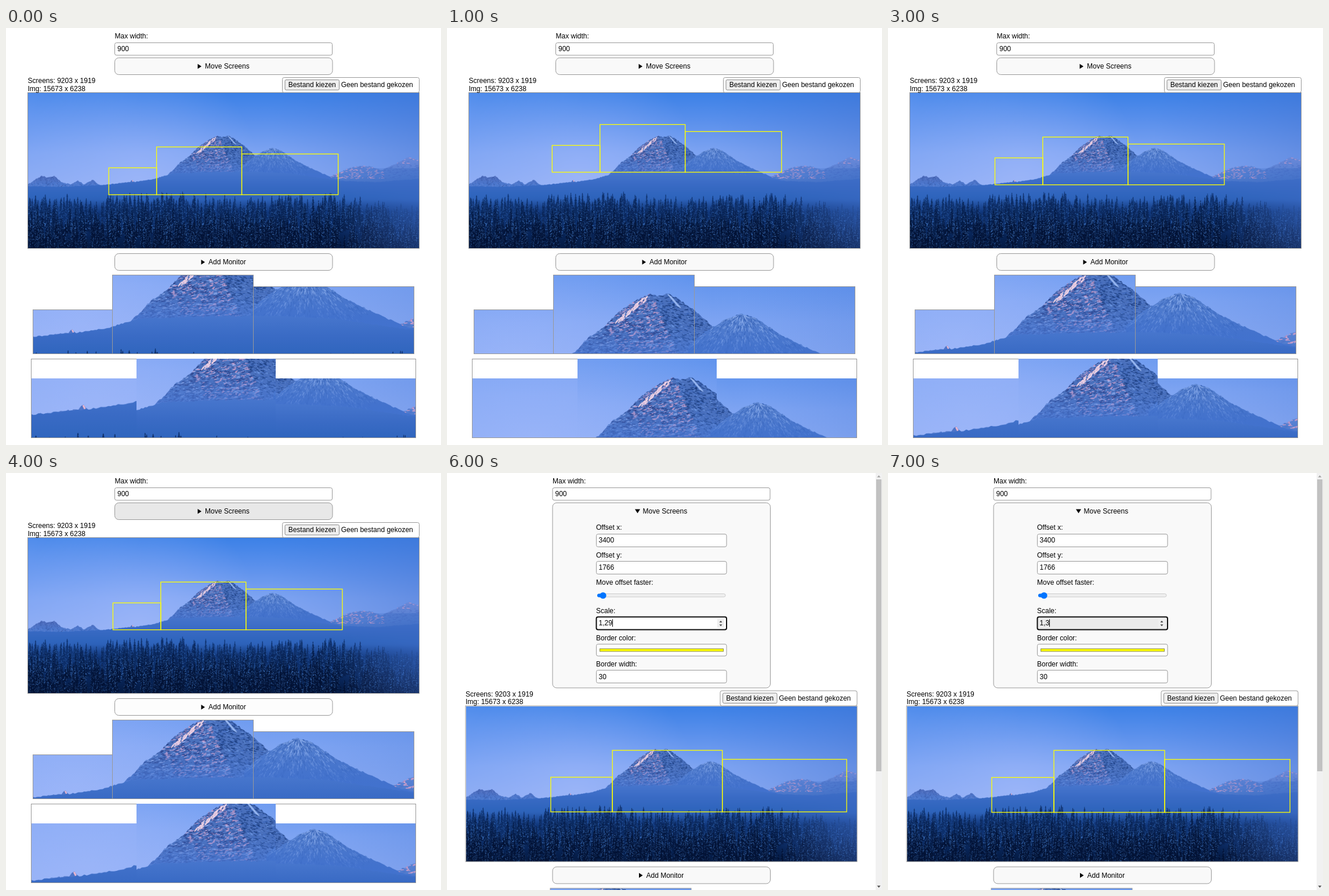
These frames come from a looping animation (750x720 px, 8 s). An HTML page with a canvas:

```html
<!DOCTYPE html>
<html lang="en">
<head>
<meta charset="utf-8">
<title>Screens over a wallpaper</title>
<style>
  html, body { margin: 0; width: 100%; height: 100%; overflow: hidden; background: #fff; }
  canvas, svg { position: absolute; left: 0; top: 0; width: 750px; height: 720px; }
  svg { font: 12px "Liberation Sans", Arial, sans-serif; }
  rect { stroke: #999; fill: #fff; }
  .card { fill: #f9f9f9; }
  .button { fill: #efefef; stroke: #8a8a8a; }
  .focus { stroke: #101010; stroke-width: 2; }
  .plain { stroke: none; }
</style>
</head>
<body>
<canvas id="view" width="750" height="720"></canvas>
<svg viewBox="0 0 750 720">
  <g id="top">
    <text x="187.5" y="18">Max width:</text>
    <rect x="187.5" y="25.5" width="375" height="21.5" rx="3"/>
    <text x="192" y="40">900</text>
    <rect id="move" class="card" x="187.5" y="51.5" width="375.5" height="29" rx="7"/>
    <path id="arrow"/>
    <text x="343" y="70">Move Screens</text>
  </g>
  <g id="panel">
    <text x="257" y="98">Offset x:</text>
    <rect x="257.5" y="105.5" width="224.5" height="22" rx="3"/>
    <text x="261.5" y="120">3400</text>
    <text x="257" y="146">Offset y:</text>
    <rect id="offsetY" x="257.5" y="152.5" width="224.5" height="22" rx="3"/>
    <text x="261.5" y="167">1766</text>
    <text x="257" y="193">Move offset faster:</text>
    <rect x="259.5" y="208.5" width="220.5" height="5.5" rx="2.7" style="fill:#efefef;stroke:#ccc"/>
    <rect class="plain" x="259" y="208.5" width="10" height="6" rx="3" style="fill:#0075ff"/>
    <circle cx="269" cy="211.5" r="5.6" fill="#0075ff"/>
    <text x="257" y="242">Scale:</text>
    <rect id="scale" x="257.5" y="248.5" width="224.5" height="22" rx="3"/>
    <text id="scaleText" x="261.5" y="263">1</text>
    <text x="257" y="289">Border color:</text>
    <rect x="257.5" y="295.5" width="224.5" height="20.5" rx="3"/>
    <rect x="263.5" y="303.5" width="213" height="4.5" style="fill:#ff0;stroke:#8a8a50"/>
    <text x="257" y="334">Border width:</text>
    <rect x="257.5" y="340.5" width="224.5" height="22" rx="3"/>
    <text x="261.5" y="356">30</text>
    <g id="spin">
      <rect class="plain" x="466" y="156" width="12" height="15" style="fill:#efefef"/>
      <path d="M469.500 162l2.500-3 2.500 3zM469.500 165.500l2.500 3 2.500-3z" fill="#444"/>
    </g>
    <path id="caret" stroke="#000"/>
    <rect class="plain" x="739" y="0" width="11" height="720" style="fill:#f1f1f1"/>
    <rect class="plain" x="740" y="11" width="9" height="504" style="fill:#c1c1c1"/>
    <path d="M741.500 7.500l3-3.500 3 3.500z" fill="#a3a3a3"/>
    <path d="M741.500 712.500l3 3.500 3-3.500z" fill="#505050"/>
  </g>
  <g id="low">
    <text x="37.5" y="95">Screens: 9203 x 1919</text>
    <text x="37.5" y="108.500">Img: 15673 x 6238</text>
    <rect x="476.5" y="85.5" width="236" height="26" rx="3"/>
    <rect class="button" x="481" y="89.5" width="93.5" height="17.500" rx="2"/>
    <text x="486.700" y="102">Bestand kiezen</text>
    <text x="577.700" y="102">Geen bestand gekozen</text>
    <rect id="add" class="card" x="187.5" y="389.5" width="375.5" height="29" rx="7"/>
    <path d="M336.500 400v8.500l6.500-4.200z"/>
    <text x="349" y="408">Add Monitor</text>
  </g>
</svg>
<script>
const $ = id => document.getElementById(id);
const W = 674.5, H = 268.5, RES = 2.5;

let seed = 11;
const rnd = () => (seed = (seed * 48271) % 2147483647) / 2147483647;
const span = (a, b) => a + (b - a) * rnd();

function paintScene() {
  const pic = document.createElement('canvas');
  pic.width = W * RES;
  pic.height = H * RES;
  const c = pic.getContext('2d');
  c.scale(RES, RES);
  c.lineCap = 'round';

  const stops = (g, list) => {
    list.forEach(([at, color]) => g.addColorStop(at, color));
    return g;
  };
  const vert = (y0, y1, ...list) => stops(c.createLinearGradient(0, y0, 0, y1), list);
  const horiz = (x0, x1, ...list) => stops(c.createLinearGradient(x0, 0, x1, 0), list);
  const glow = (x, y, r, rgb, alpha) => stops(c.createRadialGradient(x, y, 0, x, y, r),
    [[0, `rgba(${rgb},${alpha})`], [1, `rgba(${rgb},0)`]]);
  const wash = (fill, y = 0, h = H) => {
    c.fillStyle = fill;
    c.fillRect(0, y, W, h);
  };
  const line = (x, y, dx, dy, color, width) => {
    c.strokeStyle = color;
    c.lineWidth = width;
    c.beginPath();
    c.moveTo(x, y);
    c.lineTo(x + dx, y + dy);
    c.stroke();
  };

  // Fills a jagged skyline given as x, y, x, y, ...
  function ridge(pts, rough, fill, floor = 185) {
    c.beginPath();
    c.moveTo(pts[0], floor);
    for (let i = 0; i < pts.length - 2; i += 2) {
      const [x, y, u, v] = pts.slice(i, i + 4);
      const n = Math.ceil((u - x) / 2);
      for (let k = 0; k < n; k++) {
        c.lineTo(x + (u - x) * k / n, y + (v - y) * k / n + (k ? span(-rough, rough) : 0));
      }
    }
    c.lineTo(pts[pts.length - 2], pts[pts.length - 1]);
    c.lineTo(pts[pts.length - 2], floor);
    c.fillStyle = fill;
    c.fill();
  }
  function textured(draw, paint) {
    c.save();
    draw();
    c.clip();
    paint();
    c.restore();
  }

  // Sky
  wash(vert(0, 160, [0, '#3c81e7'], [.3, '#5a90ec'], [.65, '#7ea4f2'], [1, '#8fadf3']));
  wash(glow(190, 145, 210, '172,192,255', .45));
  wash(glow(0, 40, 200, '140,175,250', .3));
  wash(horiz(420, 675, [0, 'rgba(64,116,216,0)'], [1, 'rgba(64,112,206,.42)']));

  // Far ranges
  textured(() => ridge([0, 158, 10, 151, 24, 143, 33, 146, 45, 143, 58, 154, 74, 158, 86, 151, 96, 158,
    112, 150, 125, 160, 150, 157, 176, 154, 180, 150, 184, 154], 1,
    vert(140, 175, [0, '#4c66b4'], [.5, '#4c78ce'], [1, '#4a78cc'])),
  () => {
    for (let i = 0; i < 220; i++) {
      line(span(0, 130), span(143, 162), span(-3, 3), 2, rnd() < .5 ? 'rgba(45,75,150,.5)' : 'rgba(130,150,220,.4)', .7);
    }
    line(180, 151, 1, 2, '#e8b6cf', 1.5);
  });
  textured(() => ridge([505, 154, 522, 144, 538, 137, 556, 129, 572, 126, 590, 127, 602, 131, 612, 133, 628, 125,
    642, 118, 656, 111, 666, 113, 675, 117], 1, vert(110, 165, [0, '#6a88d8'], [.6, '#5580d2'], [1, '#3f6cc0'])),
  () => {
    for (let i = 0; i < 420; i++) {
      const x = span(518, 675);
      const y = span(112, 148);
      const pink = x < 610 ? y > 125 : y < 122;
      line(x, y, span(1, 5), span(-1.5, 1.5), pink && rnd() < .68 ? 'rgba(240,168,200,.72)' : 'rgba(72,108,196,.5)', .9);
    }
  });

  // Main peak: sunlit left face, blue right face
  textured(() => ridge([238, 144, 250, 133, 262, 120, 277, 110, 292, 95, 305, 85, 317, 78, 327, 74, 334, 77, 345, 74,
    357, 80, 367, 88, 377, 95, 390, 107, 402, 118, 430, 146], 1, '#4a70bc'),
  () => {
    for (let i = 0; i < 4200; i++) {
      const x = span(240, 420);
      const y = span(73, 146);
      const crest = 326 + (y - 74) * .45;
      const lit = x < crest;
      const rosy = lit && x > crest - 62;
      const ledge = Math.sin(y * 1.25 + x * .22 + 2 * Math.sin(x * .11));
      const pick = rnd() + ledge * .2;
      const dark = lit ? 'rgba(36,58,128,.7)' : 'rgba(22,56,122,.7)';
      let color = dark;
      if (pick < .2) color = lit ? 'rgba(158,184,244,.7)' : 'rgba(112,156,232,.6)';
      else if (pick < .5) color = rosy ? 'rgba(226,170,208,.75)' : lit ? 'rgba(118,154,228,.65)' : 'rgba(60,104,190,.6)';
      const len = span(.8, 3.2);
      line(x, y, len, -len * span(-.2, .6) * (lit ? 1 : -1), color, span(.4, 1));
    }
    for (let i = 0; i < 35; i++) {
      line(324 - i * .9 + span(-3, 3), 77 + i * .75, span(-3, -1), 2.5, 'rgba(248,216,230,.8)', 1.3);
      line(345 + i * .3, 75 + i * .35, 3, 2, 'rgba(150,182,240,.6)', 1);
    }
    wash(vert(108, 146, [0, 'rgba(76,122,214,0)'], [1, 'rgba(72,118,210,.9)']), 108, 80);
  });

  // Second peak
  textured(() => ridge([366, 130, 378, 119, 390, 110, 407, 100, 422, 95, 437, 100, 457, 114, 477, 125, 497, 134,
    522, 146, 550, 154], .8, vert(94, 150, [0, '#5681d0'], [1, '#416fc8'])),
  () => {
    for (let i = 0; i < 1300; i++) {
      const a = span(-1.25, 1.3);
      const r = span(1, 58);
      const len = span(.8, 4);
      const lean = Math.sin(a) + span(-.3, .3);
      const snowy = rnd() < .5 + .25 * Math.sin(a * 17 + r * .08);
      line(422 + Math.sin(a) * r * 1.5, 95 + Math.cos(a) * r, lean * len, Math.cos(a) * len,
        snowy ? 'rgba(150,182,242,.5)' : 'rgba(46,90,174,.45)', span(.4, 1));
    }
    wash(vert(108, 146, [0, 'rgba(66,114,206,0)'], [1, 'rgba(66,114,206,.95)']), 108, 80);
  });

  // Hazy slopes
  ridge([0, 161, 60, 162, 125, 159, 180, 154, 215, 149, 250, 139, 300, 137, 390, 136, 450, 139, 500, 146, 540, 152,
    600, 154, 675, 148], .6, vert(136, 196, [0, '#4776cd'], [.35, '#3a6bc5'], [.7, '#2f65bd'], [1, '#2a5cb0']), H);

  // Forest, back to front
  wash(vert(184, 268, [0, 'rgba(20,62,136,0)'], [.25, '#11387c'], [1, '#06204e']), 184, 85);
  function tree(x, top, h, dark, snow) {
    const n = Math.round(h / 2);
    line(x, top, 0, h * .5, dark, .9);
    for (let j = 1; j < n; j++) {
      const y = top + h * j / n;
      const w = (.7 + h * .15 * j / n) * span(.6, 1.3);
      c.fillStyle = dark;
      c.beginPath();
      c.moveTo(x, y - 3);
      c.lineTo(x - w, y + w * .5);
      c.lineTo(x + w, y + w * .5);
      c.fill();
      for (const side of [-1, 1]) {
        if (rnd() < .7) line(x + side * w * span(0, .7), y + span(-1, 1), side * w * .35, w * .25, snow, span(.5, 1.1));
      }
    }
  }
  const count = 1000;
  for (let i = 0; i < count; i++) {
    const d = i / count;
    const x = span(-4, W + 4);
    const edge = Math.max(0, x - 470) * .07 + 4 * Math.sin(x / 47);
    const top = 170 + edge + span(0, 16) + d ** 1.3 * 76;
    const mix = (a, b) => Math.round(a + (b - a) * Math.min(1, d * 1.6));
    tree(x, top, span(22, 40), `rgba(${mix(16, 3)},${mix(52, 20)},${mix(114, 56)},.9)`,
      `rgba(${mix(48, 84)},${mix(104, 148)},${mix(190, 232)},${span(.35, .95)})`);
  }
  wash(vert(225, 268, [0, 'rgba(2,14,42,0)'], [1, 'rgba(2,14,42,.3)']), 225, 44);
  wash(glow(720, 185, 190, '60,106,196', .75), 130, 139);
  return pic;
}

const scene = paintScene();
const ctx = $('view').getContext('2d');
ctx.imageSmoothingQuality = 'high';

// Screens: box inside the selection, then both preview rectangles
const screens = [
  { box: [0, 36, 82.4, 46.4], wall: [46.5, 486.5, 137, 76], desk: [44, 605, 181, 102] },
  { box: [82.4, 0, 146.9, 82.4], wall: [183.5, 426.5, 243, 136], desk: [225, 571, 240, 136] },
  { box: [229.3, 12.1, 166.2, 70.3], wall: [426.5, 446.5, 277, 116], desk: [465, 605, 241, 102] }
];

const home = { x: 146.4, y: 76.3 };
const open = { ...home, open: true, zoom: 1 };
const steps = [
  { x: 139.2, y: 93.4 },
  { x: 143.3, y: 54.6 },
  { x: 254.6, y: 151.4 },
  home,
  { ...home, hover: true },
  { ...open, focus: 'offsetY' },
  { ...open, zoom: 1.29, label: '1,29', focus: 'scale' },
  { ...open, zoom: 1.3, label: '1,3', focus: 'scale', hover: true }
];

function drawView(s) {
  const z = s.zoom || 1;
  ctx.setTransform(1, 0, 0, 1, 0, 0);
  ctx.clearRect(0, 0, 750, 720);
  if (s.open) ctx.translate(-5.5, 290.5);
  const frame = (rect, color = '#999', width = 1) => {
    ctx.strokeStyle = color;
    ctx.lineWidth = width;
    ctx.strokeRect(...rect);
  };
  ctx.drawImage(scene, 38, 112, W, H);
  frame([37.5, 111.5, 675, 269]);
  frame([43.5, 571.5, 663, 136]);
  for (const { box, wall, desk } of screens) {
    const [x, y, w, h] = box.map(v => v * z);
    const crop = [s.x + x, s.y + y, w, h].map(v => v * RES);
    frame([38 + s.x + x, 112 + s.y + y, w, h], '#ff0', 1.3);
    ctx.drawImage(scene, ...crop, ...wall);
    frame(wall);
    ctx.drawImage(scene, ...crop, ...desk);
  }
}

function show(s) {
  drawView(s);
  const shift = s.open ? -5.5 : 0;
  $('top').setAttribute('transform', `translate(${shift} 0)`);
  $('low').setAttribute('transform', `translate(${shift} ${s.open ? 290.5 : 0})`);
  $('panel').style.display = s.open ? '' : 'none';
  $('arrow').setAttribute('d', s.open ? 'M329.500 62.500h9l-4.500 7z' : 'M330.500 62v8.500l6.500-4.200z');
  $('move').setAttribute('height', s.open ? 319.5 : 29);
  $('move').style.fill = s.hover && !s.open ? '#e8e8e8' : '';
  $('add').style.fill = s.hover && !s.open ? '#fdfdfd' : '';
  if (!s.open) return;
  const onScale = s.focus === 'scale';
  $('scaleText').textContent = s.label || '1';
  $('scale').style.fill = s.hover ? '#ebebeb' : '';
  $('scale').setAttribute('class', onScale ? 'focus' : '');
  $('offsetY').setAttribute('class', onScale ? '' : 'focus');
  $('spin').setAttribute('transform', `translate(0 ${onScale ? 96 : 0})`);
  const end = onScale ? 262 + $('scaleText').getComputedTextLength() : 288.5;
  $('caret').setAttribute('d', `M${Math.floor(end) + .5} ${onScale ? 252.5 : 156.5}v13`);
}

let current = -1;
function tick() {
  const i = Math.floor(performance.now() % 8000 / 1000);
  if (i !== current) show(steps[current = i]);
  requestAnimationFrame(tick);
}
tick();
</script>
</body>
</html>
```
